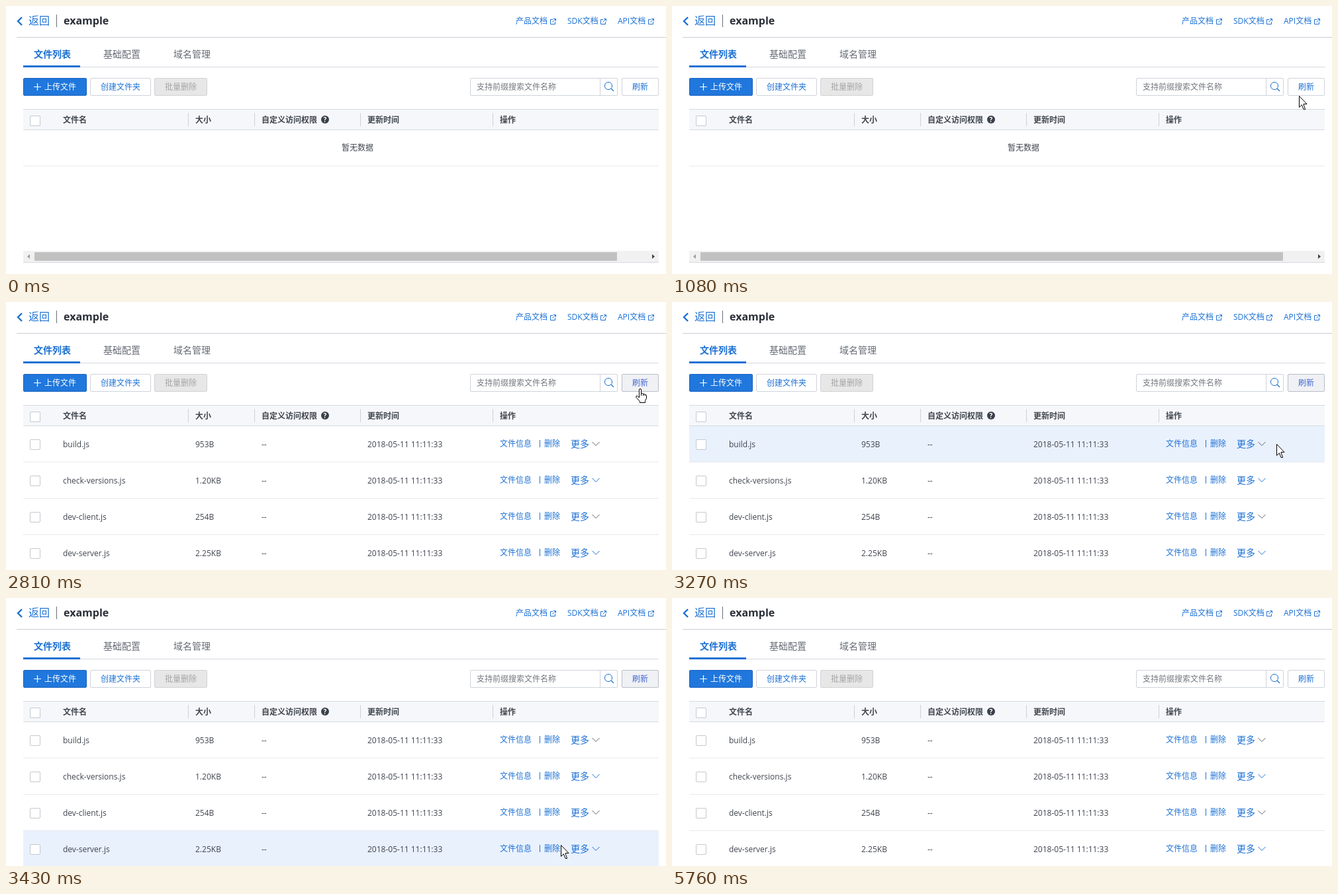
These frames come from a looping animation (997x406 px, 5.84 s). An HTML page:

```html
<!DOCTYPE html>
<html lang="zh-CN">
<head>
<meta charset="utf-8">
<title>文件列表</title>
<style>
html, body { margin: 0; width: 100%; height: 100%; overflow: hidden; background: #fff; }
svg { display: block; width: 997px; height: 406px; }
text { font: 12px "Open Sans", "Noto Sans CJK SC", "Noto Sans CJK", sans-serif; white-space: pre; }
</style>
</head>
<body>
<svg id="stage" viewBox="0 0 997 406"></svg>
<script>
const BLUE = '#1c71d4', INK = '#40454f', EDGE = '#cfd3da', LINE = '#d5d9e0';
const LOOP = 5840, LOADED = 2410, ROW_TOP = 188, ROW_H = 55;

const rect = (x, y, w, h, fill, extra = '') =>
  `<rect x="${x}" y="${y}" width="${w}" height="${h}" fill="${fill}" ${extra}/>`;
const box = (x, y, w, h, fill, stroke, id = '') =>
  rect(x + .5, y + .5, w - 1, h - 1, fill, `stroke="${stroke}" rx="1.5" ${id}`);
const path = (d, stroke, width = 1, fill = 'none') =>
  `<path d="${d}" stroke="${stroke}" stroke-width="${width}" fill="${fill}"/>`;
const text = (x, y, str, fill = INK, size = 12, weight = 400, extra = '') =>
  `<text x="${x}" y="${y}" fill="${fill}" style="font-size:${size}px;font-weight:${weight}" ${extra}>${str}</text>`;
const group = (id, body) => `<g id="${id}">${body}</g>`;
const checkbox = y => box(36, y, 16, 16, '#fff', '#c4c8cf');

function docLink(x, label, icon) {
  return text(x, 27, label, BLUE) +
    path(`M${icon + 4} 20.5h-3.5v7h7v-3.5M${icon + 5} 19.5h3.5v3.5M${icon + 8} 20l-4.5 4.5`, BLUE);
}

function header() {
  return path('M24 17l-6 6 6 6', BLUE, 2.4) +
    text(34, 28, '返回', BLUE, 16) +
    rect(76, 13, 1, 19, '#69707d') +
    text(87, 28, 'example', '#2b2f38', 16, 700) +
    docLink(770, '产品文档', 822) + docLink(848, 'SDK文档', 898) + docLink(924, 'API文档', 970) +
    rect(16, 47, 981, 1, '#c9cdd4') +
    text(42, 78, '文件列表', BLUE, 14, 700) +
    text(147, 78, '基础配置', '#666b75', 14) +
    text(253, 78, '域名管理', '#666b75', 14) +
    rect(26, 92, 960, 1, LINE) + rect(26, 90, 86, 3, BLUE);
}

function toolbar() {
  return box(26, 109, 96, 27, '#2077dc', '#1a62bd') +
    path('M42 122.5h11M47.5 117v11', '#fff', 1.2) +
    text(58, 127, '上传文件', '#fff') +
    box(127, 109, 92, 27, '#fff', EDGE) + text(143, 127, '创建文件夹', BLUE) +
    box(224, 109, 80, 27, '#e7e7e7', '#d2d2d2') + text(240, 127, '批量删除', '#a5a5a5') +
    box(701, 109, 223, 27, '#fff', EDGE) + rect(897, 110, 1, 25, EDGE) +
    text(711, 127, '支持前缀搜索文件名称', '#74777d') +
    `<circle cx="910" cy="121" r="5.6" fill="none" stroke="${BLUE}"/>` +
    path('M914 125l4 4', BLUE, 1.2) +
    box(930, 109, 56, 27, '#fff', EDGE, 'id="refresh"') +
    text(946, 127, '刷新', BLUE, 12, 400, 'id="refreshLabel"');
}

function tableHead() {
  const titles = [[86, '文件名'], [286, '大小'], [386, '自定义访问权限'], [546, '更新时间'], [746, '操作']];
  return rect(26, 156, 960, 32, '#f5f7fa') +
    rect(26, 156, 960, 1, LINE) + rect(26, 187, 960, 1, LINE) +
    checkbox(166) +
    titles.map(([x, s]) => text(x, 177, s, INK, 12, 700)).join('') +
    [275, 375, 535, 735].map(x => rect(x, 162, 1, 20, '#cdd1d8')).join('') +
    `<circle cx="482" cy="172" r="6" fill="#3a404c"/>` +
    text(482, 175.8, '?', '#fff', 10, 700, 'text-anchor="middle"');
}

function emptyTable() {
  return text(507, 219, '暂无数据') + rect(26, 242, 960, 1, '#e6e9ee') +
    rect(26, 371, 960, 17, '#f1f1f1') + rect(26, 388, 960, 1, LINE) +
    rect(43, 373, 880, 13, '#c1c1c1') +
    '<path d="M36 376v7l-4-3.5z" fill="#a0a0a0"/><path d="M976 376v7l4-3.5z" fill="#444"/>';
}

function fileRow([name, size], i) {
  const y = ROW_TOP + i * ROW_H;
  return checkbox(y + 20) +
    text(86, y + 32, name) + text(286, y + 32, size) + text(386, y + 32, '--') +
    text(546, y + 32, '2018-05-11 11:11:33') +
    text(746, y + 31, '文件信息', BLUE) + rect(806, y + 21, 1, 11, BLUE) +
    text(813, y + 31, '删除', BLUE) + text(853, y + 32, '更多', BLUE, 14) +
    path(`M885.5 ${y + 24}l5.5 5.5 5.5-5.5`, i % 2 ? BLUE : '#59616e') +
    rect(26, y + 54, 960, 1, '#e6e9ee');
}

const files = [['build.js', '953B'], ['check-versions.js', '1.20KB'], ['dev-client.js', '254B'], ['dev-server.js', '2.25KB']];
const arrow = path('M.5.5V17.5L4.4 13.8 7 20.5H9.6L7 13V12.5H12Z', '#000', 1, '#fff');
const hand = path('M5.5 14V2Q5.5.5 7 .5T8.5 2V7.5Q11.5 6.5 11.5 8.5Q14 7.5 14 9.5Q16.5 9 16.5 11V15L14.5 18.5V21.5H6.5V19.5L1 13.5Q0 11 2.5 11Z', '#000', 1, '#fff') +
  path('M8.5 7.5V11M11.5 8.5V11M14 9.5V11', '#000');

const $ = id => document.getElementById(id);
$('stage').innerHTML = header() + toolbar() + tableHead() +
  rect(26, ROW_TOP, 960, ROW_H - 1, '#e9f1fd', 'id="hover"') +
  group('empty', emptyTable()) + group('files', files.map(fileRow).join('')) +
  group('arrow', arrow) + group('hand', hand);

// Pointer samples: time, x, y, shape (none hides it); each is held until the next.
const moves = [
  [0], [530, 800, 394, 'arrow'], [610, 811, 340, 'arrow'], [690, 828, 279, 'arrow'],
  [760, 849, 226, 'arrow'], [850, 879, 190, 'arrow'], [920, 907, 166, 'arrow'],
  [1000, 931, 148, 'arrow'], [1080, 947, 136, 'arrow'],
  [1160, 950, 127, 'hand'], [1240, 952, 123, 'hand'], [1320, 952, 121, 'hand'],
  [1870, 952, 123, 'hand'], [1940, 952, 125, 'hand'],
  [2660, 952, 127, 'hand'], [2740, 951, 131, 'hand'], [2820, 954, 139, 'arrow'],
  [2890, 949, 150, 'arrow'], [2970, 942, 163, 'arrow'], [3040, 934, 178, 'arrow'],
  [3120, 926, 194, 'arrow'], [3190, 919, 206, 'arrow'], [3270, 913, 215, 'arrow'],
  [3350, 881, 288, 'arrow'], [3430, 838, 374, 'arrow'], [3500]
];

const show = (id, on) => $(id).setAttribute('visibility', on ? 'visible' : 'hidden');

function draw(t) {
  const [, x, y, shape] = moves.findLast(m => m[0] <= t);
  const loaded = t >= LOADED, active = t >= 1160 && t < 5760;
  show('empty', !loaded);
  show('files', loaded);
  for (const id of ['arrow', 'hand']) {
    show(id, shape === id);
    if (shape === id) $(id).setAttribute('transform', `translate(${x} ${y})`);
  }
  const row = Math.floor((y - ROW_TOP) / ROW_H);
  show('hover', row >= 0 && row < (loaded ? files.length : 1));
  if (row >= 0) $('hover').setAttribute('y', ROW_TOP + row * ROW_H);
  $('refresh').setAttribute('fill', active ? '#f0f1f4' : '#fff');
  $('refresh').setAttribute('stroke', active ? '#b9bdc5' : EDGE);
  $('refreshLabel').setAttribute('fill', active ? '#4468d0' : BLUE);
}

const start = performance.now();
function tick() {
  draw((performance.now() - start) % LOOP);
  requestAnimationFrame(tick);
}
tick();
</script>
</body>
</html>
```
